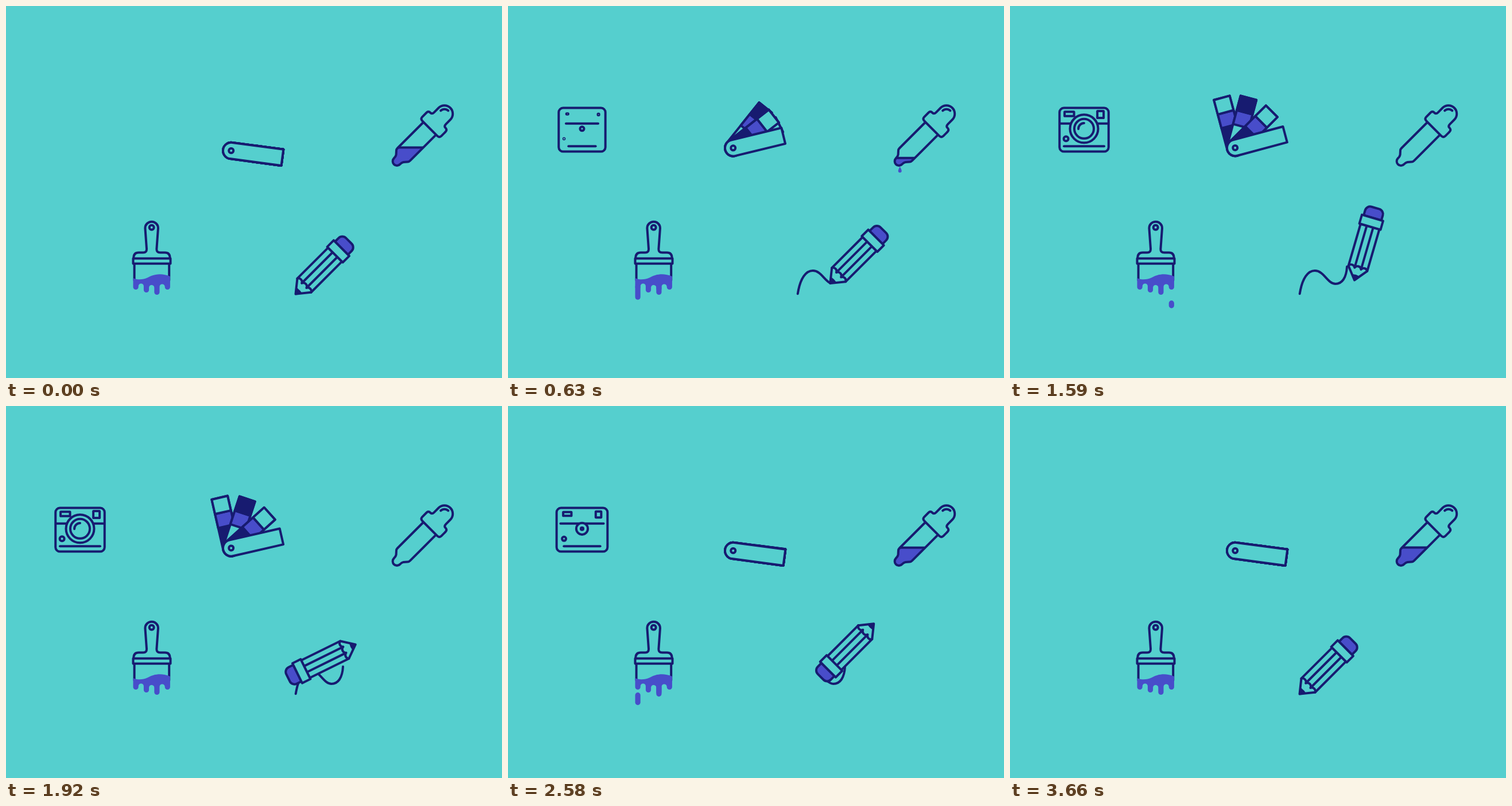
Recreate the animation shown at these times as an HTML page. Size 864x648 px, loop 3.75 s.

```html
<!DOCTYPE html>
<html lang="en">
<head>
<meta charset="utf-8">
<title>Design tools</title>
<style>
  html, body { margin: 0; width: 100%; height: 100%; overflow: hidden; background: #55cfce; }
  svg { display: block; width: 864px; height: 648px; }
  .line { fill: none; stroke: #171b70; stroke-width: 4; stroke-linecap: round; stroke-linejoin: round; }
  .bg { fill: #55cfce; }
  .ink { fill: #171b70; }
  .paint { fill: #484dca; }
  .drip { stroke: #484dca; stroke-width: 9.2; stroke-linecap: round; }
</style>
</head>
<body>
<svg viewBox="0 0 864 648" class="line">
  <defs>
    <path id="strip" d="M90-14.2H0A14.2 14.2 0 0 0 0 14.2H90Z"/>
    <g id="cool">
      <use href="#strip" class="ink"/>
      <path class="paint" d="M39-14.2H64V14.2H39Z"/>
      <path class="bg" d="M64-14.2H90V14.2H64Z"/>
    </g>
    <path id="glass" d="M81-15.5H17Q13.5-15.5 12-13.5L7-9Q4.5-7.2 0-7.4A7.4 7.4 0 0 0 0 7.4Q4.5 7.2 7 9L12 13.5Q13.5 15.5 17 15.5H81Z"/>
    <clipPath id="inGlass"><use href="#glass" transform="translate(681 270.5) rotate(-45)"/></clipPath>
  </defs>

  <g id="camera">
    <rect id="body"/>
    <path id="seam"/>
    <path id="slot"/>
    <rect id="finder" rx="0.6"/>
    <rect id="flash" rx="0.6"/>
    <circle id="button" cx="97.6" cy="231.3"/>
    <circle id="lens" class="bg" cx="129" cy="213.8"/>
    <circle id="iris" cx="129" cy="213.8"/>
    <circle id="glint" cx="129" cy="213.8" pathLength="360" stroke-dasharray="92 400"/>
  </g>

  <g id="fan">
    <use id="cardA" href="#cool"/>
    <g id="cardB">
      <use href="#strip" class="bg"/>
      <path class="paint" d="M39-14.2H64V14.2H39Z"/>
      <path class="ink" d="M64-14.2H90V14.2H64Z"/>
    </g>
    <use id="cardC" href="#cool"/>
    <g id="cardD">
      <use href="#strip" class="bg"/>
      <circle r="4"/>
    </g>
  </g>

  <g id="dropper">
    <path id="drop" class="paint" stroke="none" style="stroke:none" d="M0-11C2-6 6 0 6 4.5A6 6 0 0 1-6 4.5C-6 0-2-6 0-11Z"/>
    <g clip-path="url(#inGlass)">
      <rect id="liquid" class="paint" x="660" width="90" height="60"/>
    </g>
    <g transform="translate(681 270.5) rotate(-45)">
      <use href="#glass"/>
      <path class="bg" d="M86-23.5H96Q101-23.5 101-18.5Q101-14.5 106-14.5H117A14.5 14.5 0 0 1 117 14.5H106Q101 14.5 101 18.5Q101 23.5 96 23.5H86Q81 23.5 81 18.5V-18.5Q81-23.5 86-23.5Z"/>
    </g>
    <path d="M757.3 182.3A9.4 9.4 0 0 1 770.3 182.3"/>
  </g>

  <g id="brush">
    <path d="M222.3 439C222.3 433 225 429.5 231 429.5H239Q245.3 429.5 245 423L242.4 387A11.3 11.3 0 0 1 265 387L262.4 423Q262 429.5 268.5 429.5H277C283 429.5 285.6 433 285.6 439"/>
    <circle cx="253.7" cy="385.7" r="4"/>
    <path d="M223.6 449V478M284.2 449V478"/>
    <path d="M221.5 439.7H286.5V448.8H221.5Z"/>
    <path class="paint" style="stroke:none" d="M221.5 474C228 477 238 477.5 247 473C258 466.5 272 465 285.9 471V489.5a4.6 4.6 0 0 1-9.2 0V489a4.6 4.6 0 0 0-9.2 0V498.5a4.6 4.6 0 0 1-9.2 0V490.5a4.6 4.6 0 0 0-9.2 0V494.5a4.6 4.6 0 0 1-9.2 0V488a4.6 4.6 0 0 0-9.2 0V489.5a4.6 4.6 0 0 1-9.2 0Z"/>
    <path class="drip" id="drip0"/>
    <path class="drip" id="drip1"/>
    <path class="drip" id="drip2"/>
    <path class="drip" id="drip3"/>
  </g>

  <path id="curve" d="M504.7 501.3C509 474 519 461 531 461C547 461 553 484 567 484C578 484 586 474 587 454"/>
  <g id="pencil">
    <path class="paint" d="M113-16H122A9 9 0 0 1 131-7V7A9 9 0 0 1 122 16H113Z"/>
    <path class="bg" d="M0 0L21.2-17H97V17H21.2Z"/>
    <path d="M21.2-17A6.2 6.2 0 0 1 21-5.8A6.2 6.2 0 0 1 21 5.8A6.2 6.2 0 0 1 21.2 17M21-5.8H97M21 5.8H97"/>
    <path class="ink" stroke-width="2" d="M0 0L8-6.2Q9.5 0 8 6.2Z"/>
    <path class="bg" d="M97-19.2H113V19.2H97Z"/>
  </g>
</svg>
<script>
  const LOOP = 3750;
  const el = {};
  document.querySelectorAll('[id]').forEach(n => el[n.id] = n);

  const linear = u => u;
  const quad = u => u < .5 ? 2 * u * u : 1 - 2 * (1 - u) ** 2;
  const cubic = u => u < .5 ? 4 * u ** 3 : 1 - 4 * (1 - u) ** 3;
  const mix = (a, b, u) => a + (b - a) * u;

  // keys: time, value, time, value, ...
  function key(t, keys, ease = quad) {
    if (t <= keys[0]) return keys[1];
    for (let i = 2; i < keys.length; i += 2) {
      if (t <= keys[i]) {
        const u = (t - keys[i - 2]) / (keys[i] - keys[i - 2]);
        return mix(keys[i - 1], keys[i + 1], ease(u));
      }
    }
    return keys[keys.length - 1];
  }

  function set(id, attrs) {
    for (const k in attrs) el[id].setAttribute(k, attrs[k]);
  }
  const show = (id, on) => { el[id].style.display = on ? '' : 'none'; };

  function box(id, cx, cy, w, h) {
    show(id, w > .3);
    set(id, { x: cx - w / 2, y: cy - h / 2, width: w, height: h });
  }

  function rule(id, y, half, scale) {
    show(id, scale > .01);
    set(id, { d: `M${129 - half * scale} ${y}H${129 + half * scale}` });
  }

  function camera(t) {
    const w = t < 2000
      ? key(t, [100, 0, 790, 91, 1130, 85.5])
      : key(t, [2330, 85.5, 2540, 91, 2700, 82, 3060, 41, 3255, 14, 3330, 0], linear);
    const h = Math.max(.2, key(t, [100, 0, 590, 76, 2670, 76, 3235, 0]));
    box('body', 129, 215.6, w, h);
    set('body', { rx: Math.min(7.5, w / 2, h / 2) });

    const lines = key(t, [440, 0, 760, 1, 2520, 1, 2800, 0]);
    rule('seam', 204.8, 41.5, lines);
    rule('slot', 244.2, 35, lines);

    const small = key(t, [560, 0, 790, 1, 2520, 1, 2760, 0]);
    box('finder', 103.3, 188, 16.5 * small, 7.5 * small);
    box('flash', 157.6, 189, 11 * small, 12 * small);
    set('button', { r: 4 * small });

    const iris = key(t, [640, 0, 960, 17, 2400, 17, 2640, 0]);
    set('lens', { r: key(t, [540, 0, 880, 24.5, 2432, 24.5, 2705, 0]) });
    set('iris', { r: iris });
    set('glint', {
      r: iris * .58,
      transform: `rotate(${key(t, [1050, 158, 1500, 178])} 129 213.8)`
    });
  }

  // card: open start, open length, close start, open angle
  const cards = {
    A: [300, 780, 1770, -105],
    B: [210, 720, 1730, -75],
    C: [142, 720, 1700, -45],
    D: [88, 720, 1666, -15]
  };

  function fan(t) {
    let angle;
    for (const c in cards) {
      const [open, len, close, max] = cards[c];
      angle = key(t, [open, 7.6, open + len, max, close, max, close + 900, 7.6], cubic);
      set('card' + c, { transform: `rotate(${angle})` });
    }
    set('fan', { transform: `translate(392.2 ${mix(247, 252, (angle + 15) / 22.6)})` });
  }

  function dropper(t) {
    const level = t < 1500
      ? key(t, [30, 246.5, 1160, 281], linear)
      : key(t, [1800, 279, 2640, 246.5]);
    set('liquid', { y: level });

    const size = t < 1110 ? key(t, [150, 0, 1110, 1], linear) : key(t, [1180, 1, 1420, 0]);
    const y = t < 1110 ? key(t, [150, 273, 1110, 297], linear) : 297 + ((t - 1110) / 60) ** 2;
    show('drop', size > .01);
    set('drop', { transform: `translate(682.7 ${y}) scale(${size})` });
  }

  const dripOrder = [0, 2, 1, 3];

  function brush(t) {
    dripOrder.forEach((slot, i) => {
      const id = 'drip' + i;
      const age = (t + 3600 - 345 - slot * 240) % 1800;
      const on = t > 345 + slot * 240 && age < 570 && t < 3600;
      show(id, on);
      if (!on) return;
      const top = key(age, [345, 489.5, 570, 524.5], linear);
      const end = key(age, [0, 489.5, 570, 524.5], linear);
      set(id, { d: `M${226.1 + 18.4 * i} ${top}V${end + .01}` });
    });
  }

  const length = el.curve.getTotalLength();

  function pencil(t) {
    const drawn = key(t, [100, 0, 1000, 1]);
    const erased = key(t, [2080, 0, 2980, 1]);
    const left = (drawn - erased) * length;
    show('curve', left > .5);
    set('curve', {
      'stroke-dasharray': `${left} ${length * 2}`,
      'stroke-dashoffset': -erased * length
    });

    // the pencil turns about its middle between writing and rubbing out
    const flip = key(t, [1400, 0, 2075, 1, 3210, 1, 3640, 0]);
    const a = el.curve.getPointAtLength((t < 2700 ? drawn : 0) * length);
    const b = el.curve.getPointAtLength(erased * length);
    const x = mix(a.x + 46.1, b.x + 35.7, flip);
    const y = mix(a.y - 45.9, b.y - 52.7, flip);
    set('pencil', {
      transform: `translate(${x} ${y}) rotate(${-45 - 180 * flip}) translate(-65.5 0)`
    });
  }

  function draw(now) {
    const t = now % LOOP;
    camera(t);
    fan(t);
    dropper(t);
    brush(t);
    pencil(t);
  }

  const start = performance.now();
  function tick() {
    draw(Math.max(0, performance.now() - start));
    requestAnimationFrame(tick);
  }
  tick();
</script>
</body>
</html>
```
